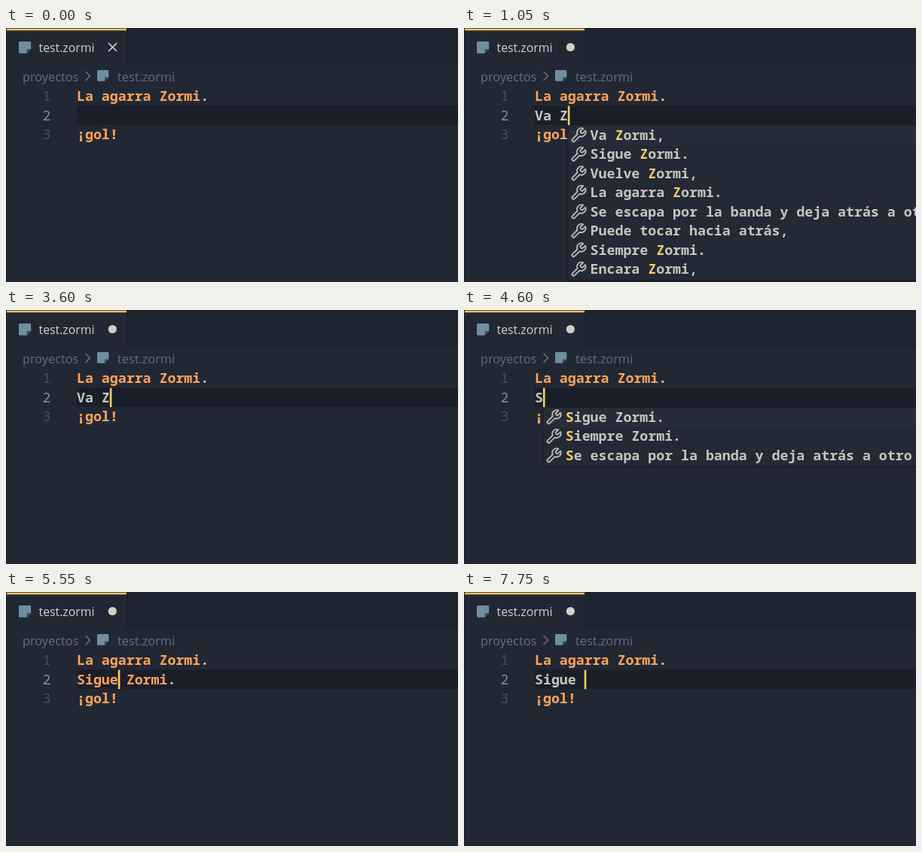
An HTML page for the animation above (8 s loop, 600 px wide and 338 px high).

```html
<!DOCTYPE html>
<html lang="es">
<head>
<meta charset="utf-8">
<title>Editor</title>
<style>
  html, body { margin: 0; width: 100%; height: 100%; overflow: hidden; background: #222833; }
  svg { display: block; width: 600px; height: 338px; }
  text { white-space: pre; }
  .code { font: 600 18.25px "Noto Sans Mono", "DejaVu Sans Mono", monospace; fill: #c5c6c0; }
  .key { font-weight: 700; fill: #ffa45c; }
  .hit { font-weight: 700; fill: #ffcc66; }
  .num { font-weight: 400; fill: #464d59; }
  .num.on { font-weight: 500; fill: #858b94; }
  .ui { font: 500 15.8px "Open Sans", "Noto Sans", sans-serif; fill: #d2d2cb; }
  .crumb { font-weight: 400; font-size: 16.3px; fill: #646c7a; }
</style>
</head>
<body>
<svg viewBox="0 0 600 338">
  <defs>
    <g id="file">
      <path d="M1.5 0H15.5Q17 0 17 1.5V10.5L11 16.5H1.5Q0 16.5 0 15V1.5Q0 0 1.5 0Z" fill="#6f8fa1"/>
      <path d="M11 16.5V12Q11 10.5 12.5 10.5H17Z" fill="#39505f"/>
    </g>
    <path id="wrench" fill="none" stroke="#b9b9b3" stroke-width="2" stroke-linejoin="round"
      d="M14.7 6.3a1 1 0 0 0 0 1.4l1.6 1.6a1 1 0 0 0 1.4 0l3.77-3.77a6 6 0 0 1-7.94 7.94l-6.91 6.91a2.12 2.12 0 0 1-3-3l6.91-6.91a6 6 0 0 1 7.94-7.94l-3.76 3.76z"/>
  </defs>

  <rect width="600" height="338" fill="#222833"/>
  <rect x="160" width="440" height="47.5" fill="#1e242f"/>
  <path d="M160.5 1V48H600M.5 0V338M0 .5H600" fill="none" stroke="#191e27"/>
  <rect x="1" y=".7" width="159" height="2.6" fill="#f5c462"/>

  <use href="#file" transform="translate(17 18) scale(.95)"/>
  <text class="ui" x="43.6" y="32.3">test.zormi</text>
  <path id="close" d="M136 20L147 31M147 20L136 31" stroke="#d2d2cb" stroke-width="1.7"/>
  <circle id="dirty" cx="141.3" cy="25.5" r="5.6" fill="#d2d0c4"/>

  <text class="ui crumb" x="22" y="70.6">proyectos</text>
  <path d="M105.5 58L111.5 64L105.5 70" fill="none" stroke="#6b7382" stroke-width="1.5"/>
  <use href="#file" transform="translate(121 56) scale(.9)"/>
  <text class="ui crumb" x="148" y="70.6">test.zormi</text>

  <rect x="94" y="103.5" width="506" height="25.5" fill="#1a1e28"/>
  <text class="code num" x="48.6" y="97">1</text>
  <text class="code num on" x="48.6" y="122.5">2</text>
  <text class="code num" x="48.6" y="148">3</text>
  <text class="code" x="94" y="97"><tspan class="key">La agarra Zormi</tspan>.</text>
  <text class="code" id="line" x="94" y="122.5"></text>
  <text class="code key" x="94" y="148">¡gol!</text>
  <g id="popup"></g>
  <rect id="caret" width="2.6" fill="#ffcc66"/>
</svg>

<script>
const LOOP = 8000, STEP = 50, LEFT = 94, CHAR = 10.95, ROW = 25.5;
const $ = id => document.getElementById(id);

const VA = "Va Zormi,", SIGUE = "Sigue Zormi.", VUELVE = "Vuelve Zormi,";
const LONG = "Se escapa por la banda y deja atrás a otro rival";
const ALL = [VA, SIGUE, VUELVE, "La agarra Zormi.", LONG,
  "Puede tocar hacia atrás,", "Siempre Zormi.", "Encara Zormi,"];

// Each event: time, text of line 2, suggestions, part of the word to highlight
const events = [
  [0, ""],
  [50, "V"],
  [250, "V", [VA, VUELVE], "V"],
  [550, "Va", [VA], "Va"],
  [750, "Va "],
  [950, "Va Z"],
  [1000, "Va Z", ALL, "Z"],
  [1100, "Va Zo", [VA, SIGUE, VUELVE], "Zo"],
  [1650, VA],
  ...erase(VA, 3150, 5),
  ...erase("Va Z", 3800, 4),
  [4250, "S"],
  [4350, "S", [""], "S"],
  [4600, "S", [SIGUE, "Siempre Zormi.", LONG], "S"],
  [4750, "Si", [SIGUE, "Siempre Zormi."], "Si"],
  ...[3, 4, 5].map((n, i) => {
    const word = SIGUE.slice(0, n);
    return [4900 + i * 150, word, [SIGUE], word];
  }),
  [5550, SIGUE],
  ...erase(SIGUE, 7100, 3),
  ...erase(SIGUE.slice(0, 9), 7500, 3)
];

// Caret height changes: start, end, from, to
const blinks = [
  [2240, 2540, 1, 0], [2780, 3060, 0, 1],
  [6190, 6460, 1, 0], [6675, 6835, 0, 1]
];

function erase(text, start, count) {
  return Array.from({ length: count }, (_, i) => [start + i * 100, text.slice(0, -1 - i)]);
}

const clamp = v => Math.min(1, Math.max(0, v));
const ease = p => p * p * (3 - 2 * p);
const span = (cls, s) => `<tspan class="${cls}">${s}</tspan>`;

function lineMarkup(text) {
  const done = text === VA || text === SIGUE;
  return done ? span("key", text.slice(0, -1)) + text.slice(-1) : text;
}

function popupMarkup(x, rows, query) {
  const h = rows.length * ROW + 1;
  let out = `<rect x="${x - .5}" y="129" width="620" height="${h + 3.5}" fill="#1a1f29"/>
    <rect x="${x + .5}" y="130" width="620" height="${h}" fill="#232935"/>
    <rect x="${x + .5}" y="130" width="620" height="${ROW + 1}" fill="#262c39"/>`;
  rows.forEach((label, i) => {
    const y = i * ROW;
    out += `<use href="#wrench" transform="translate(${x + 2.8} ${131.3 + y}) scale(.95)"/>
      <text class="code" x="${x + 29.8}" y="${148.5 + y}">${label.replace(query, s => span("hit", s))}</text>`;
  });
  return out;
}

function caretScale(t) {
  if (t < STEP) return 0;
  const b = blinks.filter(b => b[0] <= t).pop();
  return b ? b[2] + (b[3] - b[2]) * ease(clamp((t - b[0]) / (b[1] - b[0]))) : 1;
}

let shown = -1;
function draw(time) {
  const t = Math.floor(time / STEP) * STEP;
  const i = events.findLastIndex(e => e[0] <= t);
  const [start, text, rows, query] = events[i];
  const end = LEFT + text.length * CHAR;

  if (i !== shown) {
    shown = i;
    $("line").innerHTML = lineMarkup(text);
    $("popup").innerHTML = rows ? popupMarkup(end, rows, query) : "";
    $("dirty").style.display = text ? "" : "none";
    $("close").style.display = text ? "none" : "";
  }

  const before = LEFT + (i ? events[i - 1][1].length : 0) * CHAR;
  const h = 25.5 * caretScale(t);
  $("caret").setAttribute("x", before + (end - before) * clamp((t - start) / STEP));
  $("caret").setAttribute("y", 116.5 - h / 2);
  $("caret").setAttribute("height", h);
}

const begin = performance.now();
function tick() {
  draw((performance.now() - begin) % LOOP);
  requestAnimationFrame(tick);
}
tick();
</script>
</body>
</html>
```
